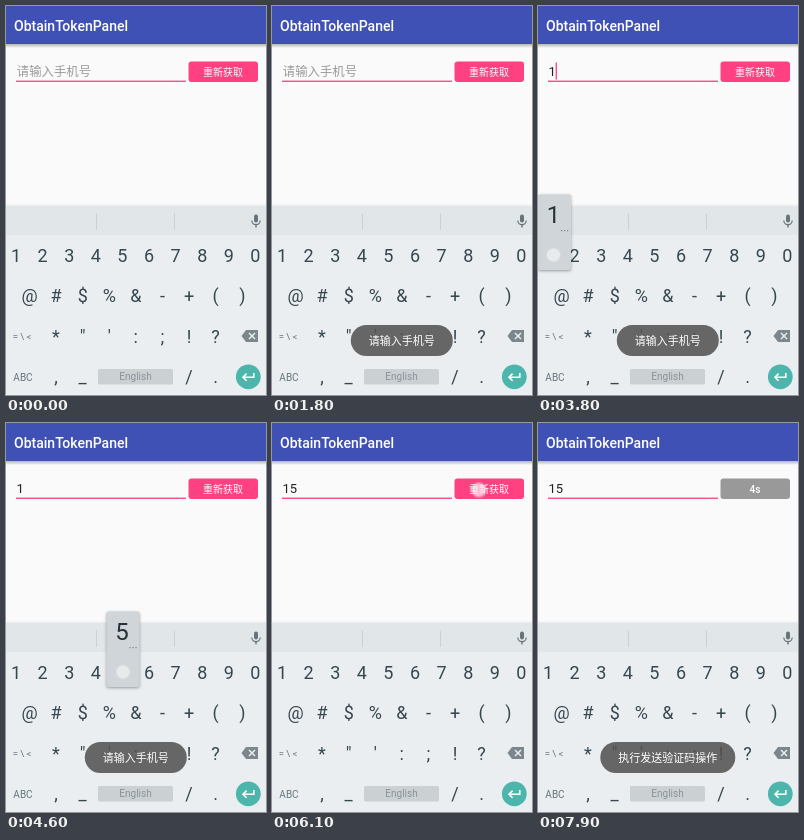
These frames come from a looping animation (260x389 px, 8 s). An HTML page with a canvas:

```html
<!DOCTYPE html>
<html lang="zh-CN">
<head>
<meta charset="utf-8">
<style>
html, body { margin: 0; width: 100%; height: 100%; overflow: hidden; background: #fafafa; }
canvas { display: block; width: 260px; height: 389px; }
</style>
</head>
<body>
<canvas id="stage"></canvas>
<script>
const W = 260, H = 389, LOOP = 8000, STEP = 100;
const PINK = '#ff4081', INK = '#37474f';
const FONT = 'Roboto, "Noto Sans CJK SC", "Noto Sans CJK", sans-serif';
const canvas = document.getElementById('stage');
const ctx = canvas.getContext('2d');
const ratio = window.devicePixelRatio || 1;
canvas.width = W * ratio;
canvas.height = H * ratio;

const within = (t, from, to) => t >= from && t < to;
const clamp = v => Math.max(0, Math.min(1, v));

function rect(x, y, w, h, color) {
  ctx.fillStyle = color;
  ctx.fillRect(x, y, w, h);
}

function box(x, y, w, h, r, color) {
  ctx.fillStyle = color;
  ctx.beginPath();
  ctx.roundRect(x, y, w, h, r);
  ctx.fill();
}

function disc(x, y, r, color) {
  ctx.fillStyle = color;
  ctx.beginPath();
  ctx.arc(x, y, r, 0, Math.PI * 2);
  ctx.fill();
}

function line(points, color, width) {
  ctx.strokeStyle = color;
  ctx.lineWidth = width;
  ctx.beginPath();
  points.forEach(([x, y]) => ctx.lineTo(x, y));
  ctx.stroke();
}

function text(str, x, y, size, color, align = 'center', weight = 400) {
  ctx.font = `${weight} ${size}px ${FONT}`;
  ctx.textAlign = align;
  ctx.fillStyle = color;
  ctx.fillText(str, x, y);
}

function shade(y, h, alpha) {
  const g = ctx.createLinearGradient(0, y, 0, y + h);
  g.addColorStop(0, `rgba(0,0,0,${alpha})`);
  g.addColorStop(1, 'rgba(0,0,0,0)');
  rect(0, y, W, h, g);
}

function appBar() {
  rect(0, 0, W, 38, '#3f51b5');
  shade(38, 4, 0.28);
  text('ObtainTokenPanel', 8, 25, 14, '#fff', 'left', 500);
}

// Caret visibility: [on, off] spans
const BLINKS = [[400, 900], [1300, 1800], [2300, 2700], [3200, 3700], [3800, 4300],
  [4700, 5200], [5600, 6100], [6500, 7000], [7400, 7900]];

function field(t) {
  const value = t < 3800 ? '' : t < 4700 ? '1' : '15';
  if (value) text(value, 10.5, 70, 13, '#212121', 'left');
  else text('请输入手机号', 10.8, 69.7, 12.4, '#9b9b9b', 'left');
  rect(10, 74.6, 170, 1.3, PINK);
  if (BLINKS.some(([on, off]) => within(t, on, off))) {
    rect(10.4 + value.length * 7.2, 56.5, 1.3, 17, PINK);
  }
}

function button(t) {
  const counting = t >= 6300;
  box(182.5, 55.5, 69.5, 20.5, 3, counting ? '#999' : PINK);
  if (counting) text(t < 7100 ? '5s' : '4s', 217, 70, 10, '#fff', 'center', 500);
  else text('重新获取', 217, 70, 10, '#fff', 'center', 500);
}

function micIcon() {
  const c = '#68747a';
  box(248, 208.5, 4, 8, 2, c);
  ctx.strokeStyle = c;
  ctx.lineWidth = 1.2;
  ctx.beginPath();
  ctx.arc(250, 214.5, 4.2, 0, Math.PI);
  ctx.stroke();
  line([[250, 218.5], [250, 221.5]], c, 1.4);
}

function deleteIcon() {
  ctx.fillStyle = '#7b878d';
  ctx.beginPath();
  [[235.5, 330], [240, 324], [252, 324], [252, 336], [240, 336]].forEach(([x, y]) => ctx.lineTo(x, y));
  ctx.fill();
  line([[243, 327], [249, 333]], '#eceff1', 1.4);
  line([[249, 327], [243, 333]], '#eceff1', 1.4);
}

function enterIcon() {
  disc(242.3, 370.8, 12.4, '#4db6ac');
  line([[247.8, 367], [247.8, 371.2], [237.2, 371.2]], '#fff', 1.6);
  line([[240.6, 367.6], [237, 371.2], [240.6, 374.8]], '#fff', 1.6);
}

function keyRow(chars, first, baseline) {
  [...chars].forEach((c, i) => {
    if (c !== ' ') text(c, first + i * 26.6, baseline, 18, INK);
  });
}

function keyboard() {
  rect(0, 200, W, H - 200, '#eaeef0');
  rect(0, 200, W, 29, '#e1e6e9');
  rect(0, 198.5, W, 1.5, '#edf0f1');
  for (const x of [90, 168]) rect(x, 207.5, 1, 16.5, '#cbd1d4');
  micIcon();
  keyRow('1234567890', 10, 255.5);
  keyRow('@#$%&-+()', 23.5, 296.3);
  keyRow('*"\':;!?', 50, 336.5);
  keyRow(',_', 50, 377);
  keyRow('/.', 183, 377);
  text('= \\ <', 16, 333.5, 9.5, '#66757d');
  text('ABC', 17, 374.5, 10, '#66757d');
  deleteIcon();
  box(92, 363, 75, 15.5, 1.5, '#cbd0d3');
  text('English', 129.5, 374.2, 10, '#89939a');
  enterIcon();
}

function keyPopup(char, x, touchX) {
  ctx.save();
  ctx.shadowColor = 'rgba(0,0,0,0.35)';
  ctx.shadowBlur = 3 * ratio;
  ctx.shadowOffsetY = ratio;
  box(x, 188.5, 33, 75.5, 2, '#cfd5d8');
  ctx.restore();
  text(char, x + 15.5, 216.5, 24, '#263238');
  for (let i = 0; i < 3; i++) rect(x + 23 + i * 3, 224, 1.2, 1.2, '#78848a');
  touch(touchX, 249);
}

function touch(x, y) {
  disc(x, y, 8, 'rgba(225,225,228,0.4)');
  disc(x, y, 6.5, 'rgba(255,255,255,0.45)');
}

function toast(str, alpha) {
  if (alpha <= 0) return;
  const w = str.length * 11 + 36;
  ctx.save();
  ctx.globalAlpha = alpha;
  box(129.8 - w / 2, 319, w, 31, 15.5, 'rgba(81,81,81,0.86)');
  text(str, 129.8, 338.7, 11, '#fff');
  ctx.restore();
}

function draw(t) {
  ctx.setTransform(ratio, 0, 0, ratio, 0, 0);
  rect(0, 0, W, H, '#fafafa');
  appBar();
  field(t);
  button(t);
  keyboard();
  if (within(t, 3600, 3900)) keyPopup('1', 0, 15.5);
  if (within(t, 4600, 4800)) keyPopup('5', 100.5, 117);
  if (within(t, 1300, 1500)) touch(225, 67);
  if (within(t, 2200, 2400)) touch(214, 68);
  if (within(t, 6100, 6300)) touch(207, 67);
  toast('请输入手机号', Math.min(clamp((t - 1400) / 400), clamp((5600 - t) / 440)));
  toast('执行发送验证码操作', clamp((t - 6200) / 330));
}

function frame(now) {
  const t = now % LOOP;
  draw(Math.floor(t / STEP) * STEP);
  requestAnimationFrame(frame);
}
requestAnimationFrame(frame);
</script>
</body>
</html>
```
